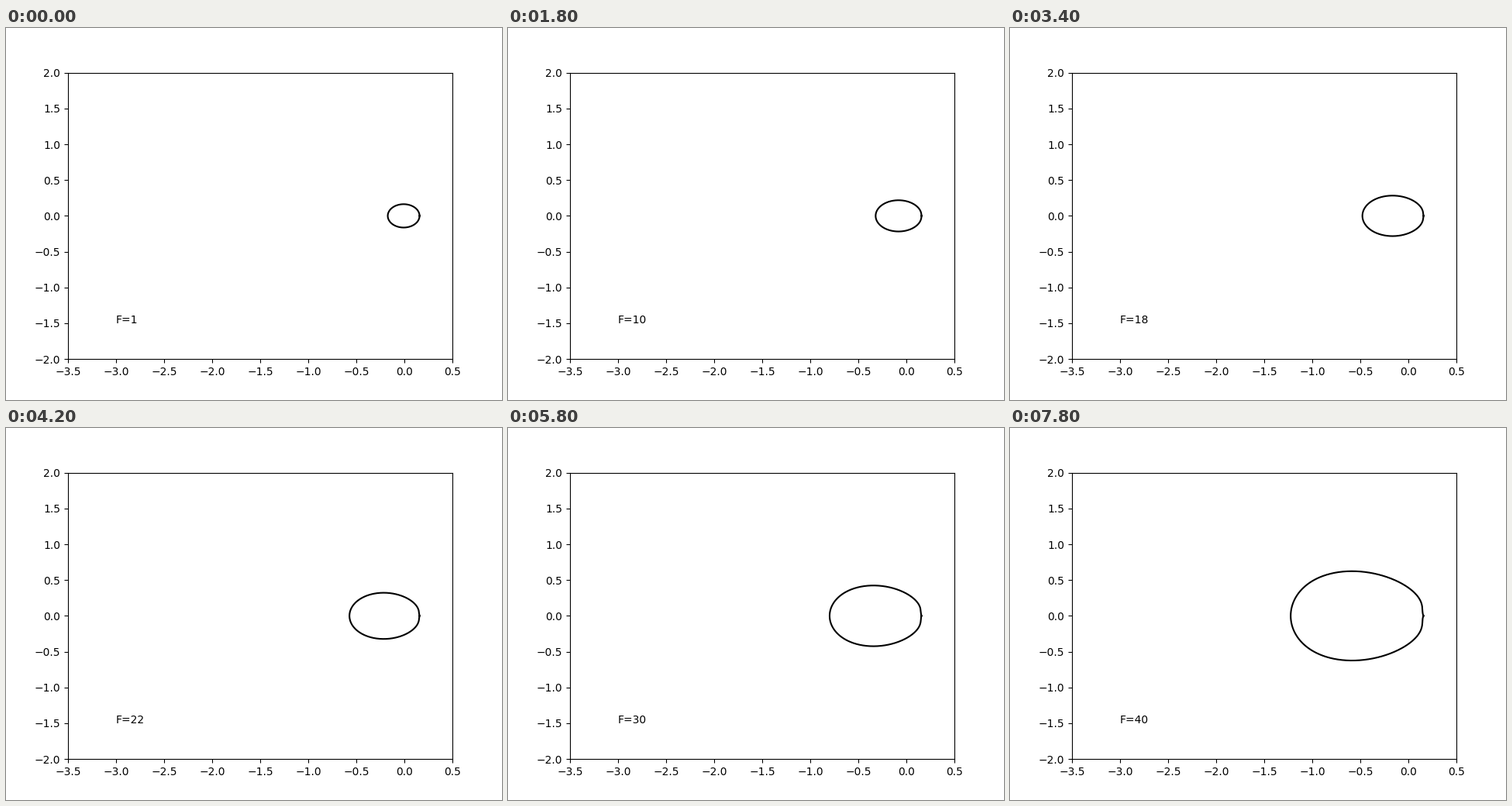
A matplotlib script that plays this animation: 640x480 px, repeating every 8000 ms.

```python
import numpy as np
import matplotlib.pyplot as plt
from matplotlib.animation import FuncAnimation

FRAMES = 40
STEP_MS = 200
TIP = 0.158      # fixed right end of the outline
LIMIT = 54       # growth diverges as the count nears this value

phi = np.linspace(0, np.pi, 240)


def outline(n):
    """Closed curve that grows leftwards from a fixed tip."""
    grow = -np.log(1 - n / LIMIT)
    left = TIP + 0.79 * grow
    height = TIP + (0.277 + 0.0017 * n) * grow
    mid = (TIP - left) / 2
    skew = 0.028 * (n / 40) ** 3
    x = mid - skew + (TIP + left) / 2 * np.cos(phi) + skew * np.cos(2 * phi)

    # sharpen the tip and fill out the shoulders beside it
    sharp = (n / 40) ** 2
    x += sharp * (0.65 * phi ** 2 * np.exp(-phi / 0.25)
                  - 0.25 * phi * np.exp(-phi / 0.12))
    y = height * np.sin(phi)
    return np.r_[x, x[-2::-1]], np.r_[y, -y[-2::-1]]


fig, ax = plt.subplots(figsize=(6.4, 4.8), dpi=100)
ax.set_xlim(-3.5, 0.5)
ax.set_ylim(-2, 2)
line, = ax.plot([], [], color="black", lw=1.5)
label = ax.text(-3, -1.5, "")


def update(i):
    n = i + 1
    line.set_data(*outline(n))
    label.set_text(f"F={n}")
    return line, label


anim = FuncAnimation(fig, update, frames=FRAMES, interval=STEP_MS,
                     repeat=True, repeat_delay=0)
plt.show()
```
